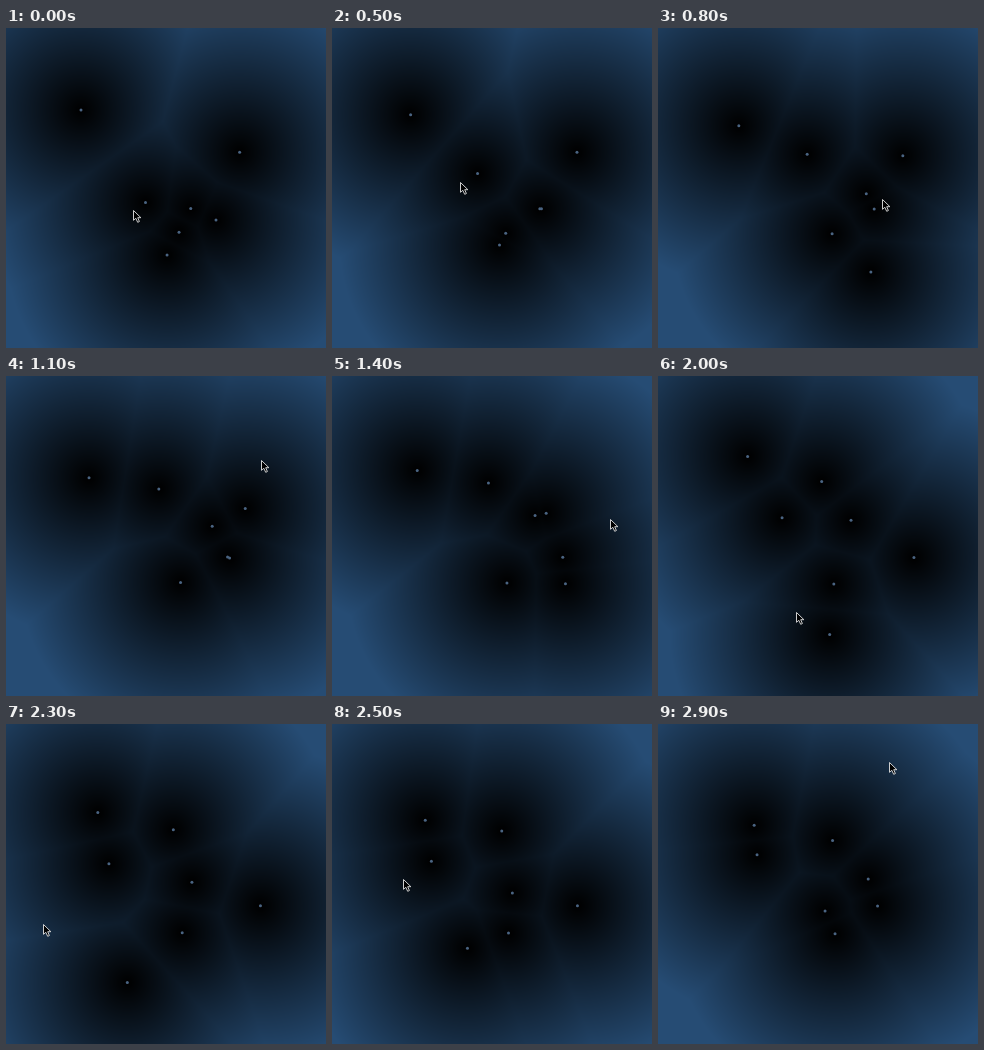
An HTML page with a canvas for the animation above (3000 ms loop, 320x320 px).

```html
<!DOCTYPE html>
<html lang="en">
<head>
<meta charset="utf-8">
<title>Cellular distance field</title>
<style>
  html, body { margin: 0; width: 100%; height: 100%; overflow: hidden; background: #000; }
  canvas { display: block; width: 320px; height: 320px; }
</style>
</head>
<body>
<canvas id="stage" width="320" height="320"></canvas>
<script>
const SIZE = 320, LOOP = 3000, STEP = 100;
const REACH = 160, BLUE = [38, 76, 116];
const ctx = document.getElementById('stage').getContext('2d');
const field = ctx.createImageData(SIZE, SIZE);
const arrow = new Path2D('M0 0V9.8L2.3 7.8L4.2 11.8L5.9 11L4.2 7.2H7.4Z');

// The pointer's path: time, x, y.
const path = [
  [0, 127, 182], [.5, 128, 154], [.8, 224, 171], [1.1, 255, 84],
  [1.7, 262, 234], [2.3, 37, 200], [2.9, 231, 38]
];

// A plain cosine, and one that lingers at both ends.
const wave = (t, mid, amp, rate, peak) => mid + amp * Math.cos(rate * (t - peak));
const swing = (t, mid, amp, rate, peak) =>
  mid + amp * Math.sin(Math.PI / 2 * Math.cos(rate * (t - peak)));

// Cubic Hermite curve through unevenly spaced keys.
function follow(keys, axis, t) {
  const last = keys.length - 1;
  const slope = i => (keys[i + 1][axis] - keys[i][axis]) / (keys[i + 1][0] - keys[i][0]);
  const tangent = i => {
    if (i === 0) return slope(0);
    if (i === last) return slope(last - 1);
    const a = keys[i][0] - keys[i - 1][0], b = keys[i + 1][0] - keys[i][0];
    return (b * slope(i - 1) + a * slope(i)) / (a + b);
  };
  let i = 0;
  while (i < last - 1 && t >= keys[i + 1][0]) i++;
  const h = keys[i + 1][0] - keys[i][0], s = (t - keys[i][0]) / h, r = 1 - s;
  return keys[i][axis] * (1 + 2 * s) * r * r + keys[i + 1][axis] * s * s * (3 - 2 * s)
    + h * s * r * (tangent(i) * r - tangent(i + 1) * s);
}

const pointerAt = t => [follow(path, 1, t), follow(path, 2, t)];

function seedsAt(t, [px, py]) {
  // One seed stays halfway between the pointer and a bobbing anchor.
  const ax = wave(t, 198, 9, 3.8, .5);
  const ay = 272 + 45 * Math.cos(2.1 * (t - .8)) ** 8;
  return [
    [75 + 7.3 * t, wave(t, 91, 11, 3.59, 1.05)],
    [swing(t, 172, 73, 1.46, .6), wave(t, 132.5, 9.2, 1.85, 1.95)],
    [139.5 + 12.1 * t, swing(t, 145.5, -40, 1.083, 1.95)],
    [wave(t, 218, 32, 1.45, 2) + wave(t, 0, 8, 3.7, .5), 180.5 + .5 * t],
    [210 - 3 * t ** 2.5, wave(t, 164.5, -27.5, 1.97, 1.62)],
    [173 + 1.4 * t, 204.3 + 1.9 * t],
    [(px + ax) / 2, (py + ay) / 2]
  ];
}

function drawField(seeds) {
  const data = field.data;
  let o = 0;
  for (let y = 0; y < SIZE; y++) {
    for (let x = 0; x < SIZE; x++) {
      let near = REACH * REACH;
      for (const [sx, sy] of seeds) {
        const dx = x + .5 - sx, dy = y + .5 - sy;
        near = Math.min(near, dx * dx + dy * dy);
      }
      const v = Math.sqrt(near) / REACH;
      for (const c of BLUE) data[o++] = c * v;
      data[o++] = 255;
    }
  }
  ctx.putImageData(field, 0, 0);
}

function drawDots(seeds) {
  ctx.fillStyle = '#4a6482';
  for (const [x, y] of seeds) {
    ctx.beginPath();
    ctx.arc(x, y, 1.5, 0, Math.PI * 2);
    ctx.fill();
  }
}

function drawPointer([x, y]) {
  ctx.save();
  ctx.translate(Math.round(x) + .5, Math.round(y) + .5);
  ctx.fillStyle = '#000';
  ctx.strokeStyle = '#e4e4e4';
  ctx.lineWidth = .9;
  ctx.fill(arrow);
  ctx.stroke(arrow);
  ctx.restore();
}

let shown = -1;
const start = performance.now();
function frame() {
  const step = Math.floor((performance.now() - start) % LOOP / STEP);
  if (step !== shown) {
    shown = step;
    const t = step * STEP / 1000;
    const pointer = pointerAt(t), seeds = seedsAt(t, pointer);
    drawField(seeds);
    drawDots(seeds);
    drawPointer(pointer);
  }
  requestAnimationFrame(frame);
}
frame();
</script>
</body>
</html>
```
